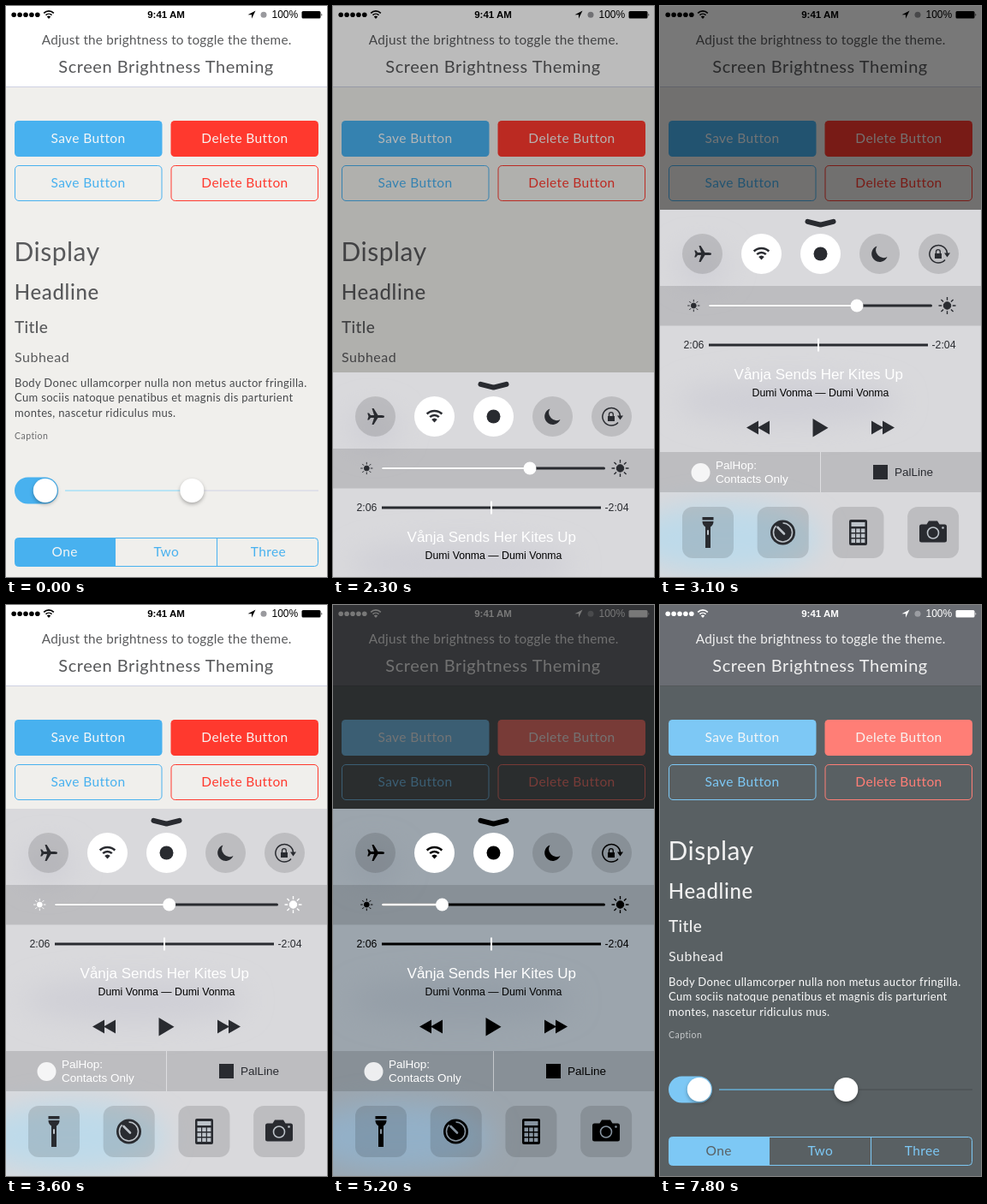
Recreate the animation shown at these times as an HTML page. Size 375x667 px, loop 8 s.

```html
<!DOCTYPE html>
<html lang="en">
<head>
<meta charset="utf-8">
<title>Screen Brightness Theming</title>
<style>
html, body { margin: 0; width: 100%; height: 100%; overflow: hidden; }
svg { display: block; width: 375px; height: 667px; }
text { font-family: Lato, "Open Sans", sans-serif; white-space: pre; }
.sys text { font-family: "Liberation Sans", Arial, sans-serif; }
.mid { text-anchor: middle; }
.btn { font-size: 15.5px; letter-spacing: .38px; text-anchor: middle; }
.body { font-size: 13px; letter-spacing: .33px; fill: var(--body); }
.line { fill: none; stroke-linecap: round; stroke-linejoin: round; }
.ink { fill: var(--ink); }
.inkLine { fill: none; stroke: var(--ink); }
.knob { fill: #fff; filter: drop-shadow(0 2px 2px rgba(0,0,0,.3)); }
.well { fill: #000; fill-opacity: .13; }
</style>
</head>
<body>
<svg id="stage" viewBox="0 0 375 667">
  <defs>
    <filter id="soft" x="-50%" y="-50%" width="200%" height="200%"><feGaussianBlur stdDeviation="16"/></filter>
    <g id="wifi" class="line">
      <path d="M-8.8 -3A12.5 12.5 0 0 1 8.8 -3M-5.3 .6A7.5 7.5 0 0 1 5.3 .6" stroke-width="2.5" stroke-linecap="butt"/>
      <path d="M0 7L-3.3 3.5A4.8 4.8 0 0 1 3.3 3.5Z" stroke="none" fill="var(--wifi)"/>
    </g>
    <g id="sun">
      <circle r="4"/>
      <path id="rays" stroke-width="1.3"/>
    </g>
    <path id="skip" d="M0 0L14 -8V8ZM13 0L27 -8V8Z"/>
  </defs>

  <!-- themed page -->
  <rect width="375" height="667" fill="var(--bg)"/>
  <rect width="375" height="94" fill="var(--head)"/>
  <rect y="94" width="375" height="1" fill="var(--rule)"/>

  <g class="sys" fill="var(--status)">
    <g id="dots"></g>
    <use href="#wifi" transform="translate(50 10.3) scale(.66)" stroke="var(--status)" style="--wifi:var(--status)"/>
    <text class="mid" x="187" y="14.3" font-size="11.5" font-weight="700">9:41 AM</text>
    <path d="M291.5 5.5L282.5 10.2H287V14.7Z"/>
    <circle cx="301" cy="10.3" r="3.5" fill="var(--faint)"/>
    <text x="310.5" y="14.3" font-size="12">100%</text>
    <rect x="345.5" y="6" width="22" height="8.5" rx="1.5"/>
    <path d="M368.5 8.6q1.8 1.7 0 3.4Z"/>
  </g>

  <g fill="var(--text)">
    <text class="mid" x="187.7" y="45.2" font-size="15.3" letter-spacing=".22">Adjust the brightness to toggle the theme.</text>
    <text class="mid" x="187.1" y="78" font-size="20" letter-spacing=".55">Screen Brightness Theming</text>
    <text x="9.5" y="298.2" font-size="30" letter-spacing=".5">Display</text>
    <text x="9.8" y="342.6" font-size="24" letter-spacing=".65" font-weight="500">Headline</text>
    <text x="10" y="382" font-size="19" letter-spacing=".35" font-weight="500">Title</text>
    <text x="10" y="415.6" font-size="16" letter-spacing=".5">Subhead</text>
    <text x="10" y="506" font-size="10.5" letter-spacing=".45" fill="var(--caption)">Caption</text>
  </g>
  <text class="body" x="10" y="444.7">Body Donec ullamcorper nulla non metus auctor fringilla.</text>
  <text class="body" x="10" y="462.4">Cum sociis natoque penatibus et magnis dis parturient</text>
  <text class="body" x="10" y="480">montes, nascetur ridiculus mus.</text>

  <rect x="10" y="134" width="172.500" height="42" rx="4.500" fill="var(--blue)"/>
  <rect x="192.5" y="134" width="172.500" height="42" rx="4.500" fill="var(--red)"/>
  <g fill="none">
    <rect x="10.5" y="186.5" width="171.500" height="41" rx="4.500" stroke="var(--blue)"/>
    <rect x="193" y="186.5" width="171.500" height="41" rx="4.500" stroke="var(--red)"/>
  </g>
  <g class="btn">
    <text x="96" y="160.3" fill="#f4f6f7">Save Button</text>
    <text x="279" y="160.3" fill="#f8f2f0">Delete Button</text>
    <text x="96" y="212.3" fill="var(--blue)">Save Button</text>
    <text x="279" y="212.3" fill="var(--red)">Delete Button</text>
  </g>

  <rect x="10" y="550.5" width="51" height="31" rx="15.5" fill="var(--blue)"/>
  <circle class="knob" cx="45.8" cy="566" r="14"/>
  <rect x="69" y="565.4" width="148" height="1.4" fill="var(--trackOn)"/>
  <rect x="217" y="565.4" width="148" height="1.4" fill="var(--track)"/>
  <circle class="knob" cx="217.3" cy="566" r="14"/>

  <path d="M127.500 621.5H14.500a4 4 0 0 0 -4 4V650.5a4 4 0 0 0 4 4H127.500Z" fill="var(--blue)"/>
  <rect x="10.500" y="621.5" width="354" height="33" rx="4" fill="none" stroke="var(--blue)"/>
  <path d="M127.500 622V654M246.500 622V654" stroke="var(--blue)"/>
  <g class="btn" fill="var(--blue)">
    <text x="68.700" y="643" fill="var(--chosen)">One</text>
    <text x="187.300" y="643">Two</text>
    <text x="306.500" y="643">Three</text>
  </g>

  <rect id="dim" width="375" height="667"/>

  <!-- control panel -->
  <g id="panel" class="sys">
    <rect y="238" width="375" height="460" fill="var(--panel)"/>
    <g filter="url(#soft)" fill="var(--shade)">
      <ellipse cx="48" cy="303" rx="30" ry="22"/>
      <ellipse cx="150" cy="462" rx="130" ry="26"/>
      <ellipse cx="75" cy="622" rx="110" ry="40" fill="var(--glow)"/>
    </g>
    <g class="well">
      <rect y="327" width="375" height="46.5"/>
      <rect y="521" width="375" height="47"/>
    </g>
    <path d="M187.5 521V568" stroke="#fff" stroke-opacity=".5"/>
    <path class="line" d="M172.5 251.800L187.5 255.600L202.5 251.800" stroke="var(--ink)" stroke-width="6"/>

    <g id="toggles"></g>
    <path class="ink" d="M60 289.5q0 -1.5 -3 -1.5h-4.5l-5 -8h-2l2.500 8h-4l-2 -2.500h-1.800l1.300 4l-1.300 4h1.800l2 -2.500h4l-2.500 8h2l5 -8h4.500q3 0 3 -1.500Z"/>
    <use href="#wifi" transform="translate(118.5 289.5)" stroke="var(--ink)" style="--wifi:var(--ink)"/>
    <circle class="ink" cx="187.5" cy="289.5" r="8"/>
    <path class="ink" d="M253.5 280.5a9.5 9.5 0 1 0 12 12.5a9 9 0 0 1 -12 -12.5Z"/>
    <path class="inkLine" d="M333 296.5a10.3 10.3 0 1 1 2.5 -7" stroke-width="1.5"/>
    <path class="ink" d="M332 288.5h7l-3.500 5ZM321 289h8v6h-8Z"/>
    <path class="inkLine" d="M322.5 289v-2a2.400 2.400 0 0 1 4.800 0v2" stroke-width="1.3"/>

    <g fill="var(--sun)" stroke="var(--sun)">
      <use href="#sun" transform="translate(39.3 350) scale(.75)"/>
      <use href="#sun" transform="translate(335.5 350) scale(1.05)"/>
    </g>
    <rect class="ink" x="57" y="348.5" width="261" height="3" rx="1.5"/>
    <rect id="level" x="57" y="348.5" height="3" rx="1.5" fill="#fff"/>
    <circle id="thumb" cy="350" r="7.5" fill="#fff"/>

    <rect class="ink" x="57" y="394.5" width="256" height="3"/>
    <rect x="184" y="388.5" width="2" height="15" fill="#fff"/>
    <g class="ink" font-size="12.3">
      <text x="27.5" y="400.3">2:06</text>
      <text x="317.5" y="400.3">-2:04</text>
      <text class="mid" x="187.5" y="456" fill="#000">Dumi Vonma — Dumi Vonma</text>
    </g>
    <text class="mid" x="185.3" y="436" font-size="17" fill="#fff">Vånja Sends Her Kites Up</text>
    <g class="ink">
      <use href="#skip" transform="translate(101 492.5)"/>
      <path d="M178.5 482V503.5L196.5 492.7Z"/>
      <use href="#skip" transform="translate(274 492.5) scale(-1 1)"/>
    </g>

    <circle cx="47.5" cy="545" r="11" fill="#fff" fill-opacity=".85"/>
    <g fill="#fff" font-size="13.5">
      <text x="65" y="541">PalHop:</text>
      <text x="65" y="557">Contacts Only</text>
    </g>
    <rect class="ink" x="249" y="536" width="17" height="17"/>
    <text class="ink" x="274" y="549.3" font-size="13.5">PalLine</text>

    <g id="tiles" class="well"></g>
    <g class="ink">
      <path d="M49.5 597h13v3.500h-13ZM49.5 602h13q0 4 -3.500 6.500v24.500h-6v-24.500q-3.500 -2.500 -3.500 -6.500Z"/>
      <rect x="55" y="612" width="2" height="6" rx="1" fill="var(--tile)"/>
      <circle cx="143.5" cy="615" r="14.5"/>
      <g fill="none" stroke="var(--tile)">
        <circle cx="143.5" cy="615" r="11" stroke-width="1.6" stroke-dasharray="60 9.1" transform="rotate(-90 143.5 615)"/>
        <path d="M145 616.500L137.500 609" stroke-width="2.600" stroke-linecap="round"/>
      </g>
      <rect x="221" y="600" width="21" height="30" rx="2"/>
      <g id="keys" fill="var(--tile)"><rect x="223.500" y="603" width="16" height="5"/></g>
      <path d="M305.500 605.500h6l2.500 -4h10l2.500 4h6q2.500 0 2.500 2.500v16q0 2.500 -2.500 2.500h-27q-2.500 0 -2.500 -2.500v-16q0 -2.500 2.500 -2.500Z"/>
      <circle cx="319" cy="615.5" r="6.5" fill="none" stroke="var(--tile)" stroke-width="1.6"/>
      <circle cx="330.5" cy="609.5" r="1.3" fill="var(--tile)"/>
    </g>
  </g>
</svg>
<script>
const $ = id => document.getElementById(id);
const stage = $('stage');

// name: [light, dark]
const theme = {
  bg: ['f0efec', '596063'], head: ['ffffff', '6a6d73'], rule: ['ced1e2', '54585b'],
  status: ['000000', 'ffffff'], faint: ['9a9a9e', '9b9da2'],
  text: ['58595b', 'f1f1f1'], body: ['47494c', 'fafafa'], caption: ['6a6b6d', 'c4c7c9'],
  blue: ['48b1ef', '7dc8f5'], red: ['ff392e', 'ff7e76'], chosen: ['f3f5f5', '596063'],
  trackOn: ['a3e0f8', '68b3de'], track: ['dadbe8', '4c5255'],
  panel: ['d9d9dc', '9ca5ad'], tile: ['bdc3c9', '86939f'],
  ink: ['292b30', '000000'], shade: ['cfcfd6', '949ea7'], glow: ['bddaea', '93b0c8']
};

const rgb = hex => [0, 2, 4].map(i => parseInt(hex.substr(i, 2), 16));
const mix = (a, b, k) => {
  const to = rgb(b);
  return `rgb(${rgb(a).map((v, i) => Math.round(v + (to[i] - v) * k))})`;
};
const ramp = (t, a, b) => Math.min(1, Math.max(0, (t - a) / (b - a)));
const row = (n, make) => Array.from({ length: n }, (_, i) => make(i)).join('');

$('dots').innerHTML = row(5, i => `<circle cx="${9.2 + i * 6.9}" cy="10.3" r="2.8"/>`);
$('toggles').innerHTML = row(5, i =>
  `<circle cx="${49.5 + i * 69}" cy="289.5" r="23.5" ${i == 1 || i == 2 ? 'fill="#fff"' : 'class="well"'}/>`);
$('tiles').innerHTML = row(4, i => `<rect x="${26 + i * 87.7}" y="585" width="60" height="60" rx="12"/>`);
$('keys').innerHTML += row(9, i =>
  `<rect x="${223.5 + i % 3 * 5.7}" y="${610.5 + (i / 3 | 0) * 6}" width="4.5" height="4.5"/>`);
$('rays').setAttribute('d', row(8, i => {
  const c = Math.cos(i * Math.PI / 4), s = Math.sin(i * Math.PI / 4);
  return `M${6 * c} ${6 * s}L${9.5 * c} ${9.5 * s}`;
}));

// vertical shift of the panel: springy rise, then a quick drop
function panelShift(t) {
  if (t < 2300 || t >= 5500) return 429;
  if (t >= 5300) return 429 * ramp(t, 5300, 5500);
  if (t < 2400) return 190;
  return -8 * (1 - ramp(t, 2400, 2700)) ** 2;
}

function draw(now) {
  const t = Math.floor(now % 8000 / 100) * 100;
  const dark = ramp(t, 3600, 4000);
  const held = ramp(t, 3300, 3600) - ramp(t, 4500, 4900);
  const shown = ramp(t, 2200, 2400) - ramp(t, 5300, 5500);
  const x = 127.5 + 102.5 * (1 - ramp(t, 3300, 4400)) ** 1.52;

  for (const [name, [a, b]] of Object.entries(theme))
    stage.style.setProperty('--' + name, mix(a, b, dark));
  stage.style.setProperty('--sun', mix(theme.ink[dark > .5 ? 1 : 0], 'ffffff', held ** 3));

  $('dim').setAttribute('opacity', .53 * shown * (1 - held));
  $('panel').setAttribute('transform', `translate(0 ${panelShift(t)})`);
  $('level').setAttribute('width', x - 57);
  $('thumb').setAttribute('cx', x);
}

const start = performance.now();
function tick() {
  draw(performance.now() - start);
  requestAnimationFrame(tick);
}
tick();
</script>
</body>
</html>
```
